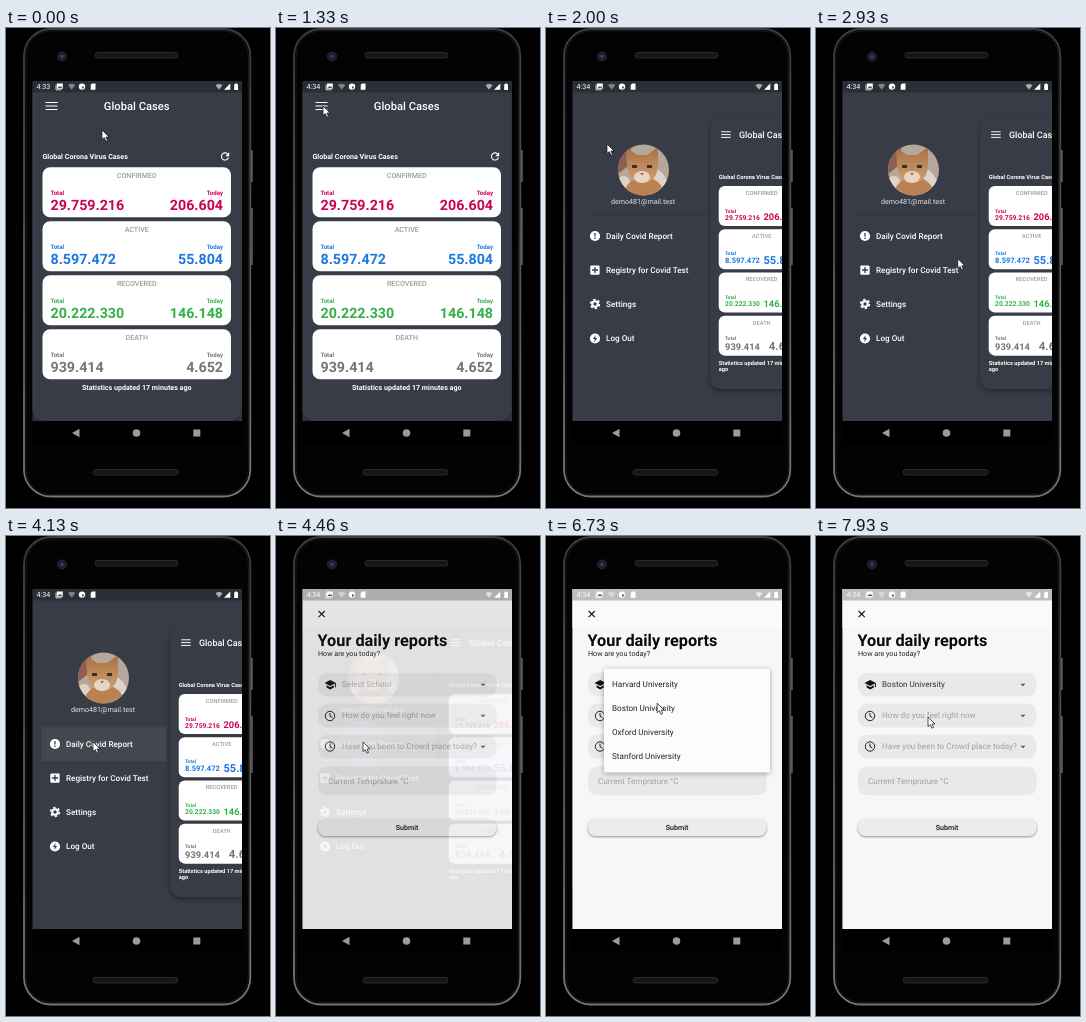
An HTML page that plays this animation: 264x480 px, repeating every 8 s.

```html
<!DOCTYPE html>
<html lang="en">
<head>
<meta charset="utf-8">
<title>Health report app</title>
<style>
  html, body { margin: 0; width: 100%; height: 100%; overflow: hidden; background: #000; }
  svg { display: block; width: 100vw; height: 100vh; }
  text { font-family: Roboto, sans-serif; text-rendering: geometricPrecision; white-space: pre; }
  #panel { filter: drop-shadow(0 3px 3px rgba(0, 0, 0, .35)); }
  #menuBox { filter: drop-shadow(0 1.5px 2.5px rgba(0, 0, 0, .35)); }
  #submit { filter: drop-shadow(0 1px 1px rgba(0, 0, 0, .4)); }
</style>
</head>
<body>
<svg viewBox="0 0 264 480">
  <defs>
    <clipPath id="screen"><rect x="26.5" y="53" width="209.5" height="340"/></clipPath>
    <clipPath id="panelClip"><rect width="209.5" height="340" rx="13"/></clipPath>
    <clipPath id="avatar"><circle cx="97.5" cy="142" r="25.5"/></clipPath>
    <clipPath id="menuClip"><rect id="menuArea" x="58" y="132.5" width="166" rx="1.5"/></clipPath>
    <linearGradient id="fur" x2="0" y2="1"><stop stop-color="#a8713f"/><stop offset="1" stop-color="#cfa176"/></linearGradient>
    <linearGradient id="rim" x2="0" y2="1"><stop stop-color="#3c3c3f"/><stop offset=".5" stop-color="#57575a"/><stop offset="1" stop-color="#77777a"/></linearGradient>
  </defs>

  <!-- phone -->
  <path d="M244 122h2.8v32H244zM244 180h2.8v57H244z" fill="#58585b"/>
  <rect x="18" y="1" width="226.3" height="467.5" rx="27" fill="#030304" stroke="url(#rim)" stroke-width="1.8"/>
  <rect x="20" y="3" width="222.3" height="463.5" rx="25" fill="none" stroke="#19191b"/>
  <g fill="#161618" stroke="#2b2b2e">
    <rect x="89" y="24.5" width="83" height="5.5" rx="2.7"/>
    <rect x="87" y="441.5" width="85" height="5.5" rx="2.7"/>
  </g>
  <circle cx="56" cy="28.5" r="4.5" fill="#1a2030" stroke="#25272c"/>
  <circle cx="56" cy="28.5" r="1.8" fill="#31405c"/>
  <rect x="26.5" y="393" width="209.5" height="24" fill="#000"/>
  <g fill="#9b9b9b"><path d="M66 405l7.5-4.2v8.4z"/><circle cx="130.5" cy="405" r="3.8"/><rect x="187.3" y="401.5" width="7" height="7"/></g>

  <g clip-path="url(#screen)">
    <rect x="26" y="53" width="211" height="340" fill="#373c46"/>
    <g id="drawer"></g>
    <g id="panel">
      <rect width="209.5" height="340" rx="13" fill="#373c46"/>
      <g id="home" clip-path="url(#panelClip)"></g>
    </g>
    <g id="report"></g>
    <g id="menu">
      <rect id="menuBox" x="58" y="132.5" width="166" rx="1.5" fill="#fcfcfc"/>
      <g clip-path="url(#menuClip)">
        <rect id="picked" x="58" y="160.5" width="166" height="24"/>
        <g id="options"></g>
      </g>
    </g>
    <rect x="26" y="53" width="211" height="11.5" opacity=".24"/>
    <g fill="#fff">
      <text id="clock" x="30.5" y="59" dy=".35em" font-size="7.13"></text>
      <path d="M50.8 55.5h6v5.3h-6zM84.7 56.8l1.6-1.3h3.2v6.2h-4.8z"/>
      <path d="M50 56.8v5h5.6" fill="none" stroke="#fff" stroke-width=".8"/>
      <path d="M62 57q3.7-2.5 7.4 0l-3.7 4.7z" opacity=".4"/>
      <circle cx="76" cy="58.6" r="3.2"/>
      <path d="M76 58.6h2.2a2.2 2.2 0 0 1-2.2 2.2z" fill="#555"/>
      <path d="M51.6 60l1.6-2 1 1 .9-1.2 1 2.2z" fill="#555"/>
      <path d="M209.5 57.2q3.5-2.6 7 0l-3.5 4.5z" opacity=".6"/>
      <path d="M224.3 55.5v6.3h-6.3zM228.2 56.3h1v-.8h1.8v.8h1v5.6h-3.8z"/>
    </g>
  </g>
  <path id="cursor" d="M0 0v9.6l2.3-2 1.5 3.6 1.7-.7-1.5-3.5h3z" fill="#fff" stroke="#111" stroke-width=".7"/>
</svg>
<script>
const $ = id => document.getElementById(id);
const clamp = v => Math.max(0, Math.min(1, v));
const progress = (t, start, length) => clamp((t - start) / length);
const label = (x, y, size, fill, str, weight = 400, anchor = 'start') =>
  `<text x="${x}" y="${y}" dy=".35em" font-size="${size}" fill="${fill}" font-weight="${weight}" text-anchor="${anchor}">${str}</text>`;

const S = 7.13, M = 8.15, L = 14.26;
const cards = [
  ['CONFIRMED', '29.759.216', '206.604', '#cf0052'],
  ['ACTIVE', '8.597.472', '55.804', '#1a78e0'],
  ['RECOVERED', '20.222.330', '146.148', '#34b04a'],
  ['DEATH', '939.414', '4.652', '#757575'],
];

// Numbers shrink to fit their half of the card.
function figure(x, y, room, name, value, color, anchor) {
  const dots = value.split('.').length - 1;
  const fit = Math.min(1, room / (((value.length - dots) * .575 + dots * .3) * L));
  const mid = y + 38 + (1 - fit) * 3;
  return label(x, mid - 2 - 10 * fit, 6.1, color, name, 700, anchor) +
    label(x, mid, L * fit, color, value, 700, anchor);
}

function drawHome(p, lift, ripple) {
  const width = 209.5 - 81 * p, card = width - 21, room = (card - 20) / 2, menuY = 25 - 3 * p;
  let out = `<path d="M0 7h17a16 16 0 0 1 0 32H4q-4 0-4-4z" fill="#8c8983" opacity="${ripple}"/>
    <path d="M13.5 ${menuY - 3.5}h12m-12 3.5h12m-12 3.5h12" stroke="#fff" stroke-width="1.2"/>` +
    label(width / 2 + 4.5 * p, menuY, 11.2, '#fff', 'Global Cases', 500, 'middle') +
    `<g transform="translate(0 ${lift})">` +
    label(10.5, 75.5, S, '#fff', 'Global Corona Virus Cases', 700) +
    `<g transform="translate(${width - 16.5} 75.5)" fill="#fff">
      <path d="M2.6-2.6A3.6 3.6 0 1 0 3.5 1" fill="none" stroke="#fff" stroke-width="1.1"/><path d="M4.2-4.2v3.9H.3z"/></g>`;
  cards.forEach(([title, total, today, color], i) => {
    const y = 86.3 + 54 * i;
    out += `<rect x="10.5" y="${y}" width="${card}" height="50" rx="7.6" fill="#fff"/>` +
      label(width / 2, y + 8.7, S, '#9b9b9b', title, 500, 'middle') +
      figure(18.5, y, room, 'Total', total, color, 'start') +
      figure(width - 18.5, y, room, 'Today', today, color, 'end');
  });
  const note = 'Statistics updated 17 minutes';
  out += card < 110
    ? label(10.5, 307, S, '#fff', note, 700) + label(10.5, 315.6, S, '#fff', 'ago', 700)
    : label(width / 2, 307, S, '#fff', note + ' ago', 700, 'middle');
  $('home').innerHTML = out + '</g>';
}

const dark = '#373c46';
$('drawer').innerHTML = `
  <g clip-path="url(#avatar)">
    <rect x="72" y="116" width="52" height="52" fill="#b5a79c"/>
    <path d="M72 116h14l-4 22-10 8zM110 116h14v16z" fill="#8d5f50"/>
    <path d="M72 150q14-8 14 18H72zM108 140q14 4 16 28h-20z" fill="#ddd3c8"/>
    <ellipse cx="98" cy="167" rx="20" ry="18" fill="#b98250"/>
    <path d="M81 138l-1-19 11 8h10l11-8v20q-2 15-15 16-14-1-16-17z" fill="url(#fur)"/>
    <ellipse cx="96" cy="149" rx="8" ry="6" fill="#e6d6c5"/>
    <path d="M94 145h4l-2 2.5z" fill="#a8605a"/>
    <path d="M86 137h5v3h-5zM101 137h5v3h-5z" fill="#3d2e20"/>
  </g>` + label(97, 174, S, '#e4e4e6', 'demo481@mail.test', 400, 'middle') + `
  <path d="M40 187h120" stroke="#30343d" stroke-width=".7"/>
  <rect id="tapped" x="35.5" y="191" width="124.5" height="34" fill="#909088" opacity="0"/>
  <circle id="splash" cx="86" cy="207" fill="#fff" opacity=".12" r="0"/>
  <g fill="#fff">
    <circle cx="49" cy="208" r="5.1"/><rect x="44.3" y="237.4" width="9.3" height="9.3" rx="1"/>
    <circle cx="49" cy="276" r="3.8"/><circle cx="49" cy="310.5" r="5.1"/>
    <circle cx="49" cy="276" r="4.3" fill="none" stroke="#fff" stroke-width="1.8" stroke-dasharray="2.3 2.2"/>
  </g>
  <path d="M49 205v3.6m0 1v1.3M46 242h6m-3-3v6" stroke="${dark}" stroke-width="1.3"/>
  <circle cx="49" cy="276" r="1.7" fill="${dark}"/>
  <path d="M49.8 307l-3 4h2l-.6 3.2 3-4.2h-2z" fill="${dark}"/>` +
  ['Daily Covid Report', 'Registry for Covid Test', 'Settings', 'Log Out']
    .map((name, i) => label(60, 208 + 34 * i, M, '#fff', name, 500)).join('');

const hint = '#a0a0a2', pill = '#e9e9eb';
const field = (y, str, id) =>
  `<rect x="42" y="${y - 11.7}" width="178.5" height="23.6" rx="9" fill="${pill}"/>
   <path d="M204.5 ${y - .8}h5l-2.5 2.6z" fill="#555"/><g id="${id}">${label(66, y - .5, M, hint, str)}</g>`;
const dial = y => `<circle cx="54" cy="${y}" r="4.7"/><path d="M54 ${y - 3}v3.2l2.4 1.4"/>`;
$('report').innerHTML = `
  <rect x="26" y="53" width="211" height="340" fill="#f7f6f9"/>
  <rect x="26" y="53" width="211" height="39" fill="#fafafb"/>
  <path d="M42.6 75l6.2 6.2m0-6.2l-6.2 6.2" stroke="#111" stroke-width="1.1"/>` +
  label(41.5, 104, 16.3, '#080808', 'Your daily reports', 700) +
  label(42, 118, S, '#222', 'How are you today?') +
  field(148.5, 'Select School', 'school') + field(179.5, 'How do you feel right now', 'feeling') +
  field(210.5, 'Have you been to Crowd place today?', 'crowd') + `
  <path d="M48.5 147l5.7-3.1 5.7 3.1v4.2h-1v-3.6l-4.7 2.5zM50.6 149.2l3.6 2 3.6-2v2.3l-3.6 2-3.6-2z" fill="#111"/>
  <g fill="none" stroke="#222">${dial(180)}${dial(210.5)}</g>
  <rect x="42" y="230.5" width="178.5" height="28.8" rx="9" fill="${pill}"/>` +
  label(52, 245, M, hint, 'Current Temprature °C') + `
  <rect id="submit" x="42" y="283" width="178.5" height="17" rx="7.5" fill="#ececee"/>` +
  label(131, 292, S, '#111', 'Submit', 500, 'middle');

$('options').innerHTML = ['Harvard University', 'Boston University', 'Oxford University', 'Stanford University']
  .map((name, i) => label(66, 148.5 + 24 * i, M, '#222', name)).join('');

// Pointer stops: time, x, y
const stops = [
  [0, 96, 102], [200, 150, 8], [430, 210, 120], [630, 170, 278], [867, 110, 169], [1067, 47, 79],
  [1300, 47, 79], [1333, 47, 78], [1733, 48, 79], [2000, 61, 116], [2333, 74, 119], [2500, 74, 119],
  [2733, 224, 268], [3067, 87, 206], [4960, 87, 206], [5533, 119, 150], [6400, 119, 150],
  [6867, 108, 174], [7600, 108, 174], [7933, 112, 181], [8100, 112, 181],
];
function pointer(t) {
  const i = stops.findIndex(s => s[0] > t);
  const [t0, x0, y0] = stops[i - 1], [t1, x1, y1] = stops[i], u = (t - t0) / (t1 - t0);
  return `translate(${x0 + (x1 - x0) * u} ${y0 + (y1 - y0) * u})`;
}

function render(t) {
  const p = progress(t, 1661, 250);
  const ripple = t < 1660 ? 0 : .7 * (1 - progress(t, 1660, 300));
  $('drawer').setAttribute('transform', `translate(${-139 * (1 - p)} 0)`);
  $('panel').setAttribute('transform', `translate(${26 + 138.3 * p} ${53 + 36 * p}) scale(${1 - .2 * p})`);
  drawHome(p, p && 114 * (1 - p), ripple);

  $('clock').textContent = t < 460 ? '4:33' : '4:34';
  $('tapped').setAttribute('opacity', t < 4130 ? 0 : .13);
  $('splash').setAttribute('r', t < 4130 ? 0 : 3 + (t - 4133) * .06);
  $('report').setAttribute('opacity', 1 - (1 - progress(t, 4333, 200)) ** 2);

  const open = progress(t, 6090, 300), close = progress(t, 7270, 300);
  const height = 32 + 72 * progress(open, .25, .25);
  $('menu').setAttribute('opacity', clamp(open * 4) * (1 - close));
  $('menuBox').setAttribute('height', height);
  $('menuArea').setAttribute('height', height);
  $('options').setAttribute('opacity', progress(open, .4, .6));
  $('picked').setAttribute('opacity', .12 * progress(t, 7070, 150));
  $('school').innerHTML = t < 7270 ? label(66, 148, M, hint, 'Select School') : label(66, 148, M, '#333', 'Boston University');
  $('cursor').setAttribute('transform', pointer(t));
}

const STEP = 1000 / 15;
let last = -1;
function tick() {
  const step = Math.floor((performance.now() % 8000 + 7) / STEP);
  if (step !== last) render((last = step) * STEP);
  requestAnimationFrame(tick);
}
tick();
</script>
</body>
</html>
```
